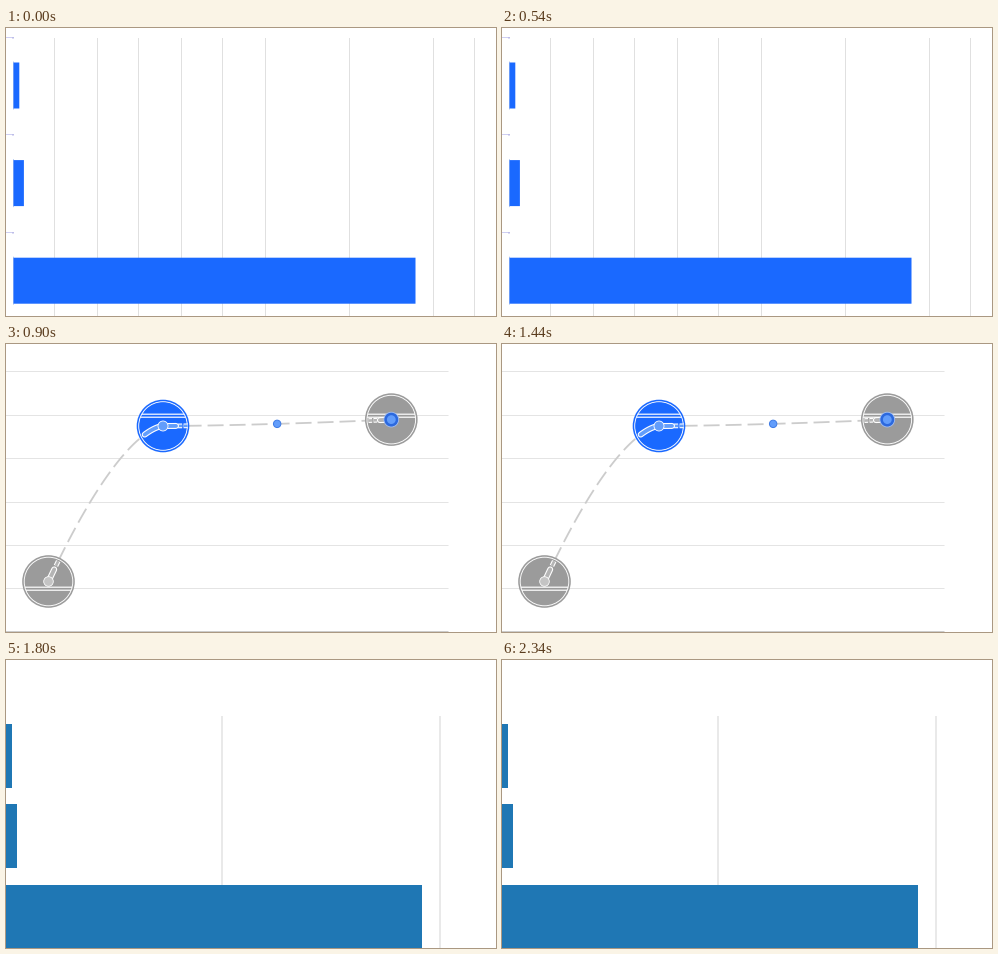
These frames come from a looping animation (490x288 px, 2700 ms). A matplotlib script:

```python
import matplotlib.pyplot as plt
import numpy as np
from matplotlib.animation import ArtistAnimation
from matplotlib.patches import Circle, PathPatch, Rectangle
from matplotlib.path import Path

W, H, DPI = 490, 288, 100
PX = 72 / DPI  # points per pixel

VALUES = (5.8, 10.4, 402)
BLUE, STEEL, SKY = "#1a69ff", "#1f77b4", "#629dfb"
GRAY, SILVER = "#9b9b9b", "#b4b4b4"

fig = plt.figure(figsize=(W / DPI, H / DPI), dpi=DPI, facecolor="white")
ax = fig.add_axes([0, 0, 1, 1])
ax.set_xlim(0, W)
ax.set_ylim(H, 0)
ax.axis("off")


def box(x, y, w, h, color):
    return ax.add_patch(Rectangle((x, y), w, h, fc=color, lw=0, snap=False))


def disc(x, y, r, fill, edge="none", width=0.0):
    return ax.add_patch(Circle((x, y), r, fc=fill, ec=edge, lw=width * PX))


def stroke(points, color, width, dash=None, cap="butt"):
    style = "-" if dash is None else (0, tuple(d / width for d in dash))
    return ax.add_patch(PathPatch(
        Path(points), fc="none", ec=color, lw=width * PX, ls=style,
        capstyle=cap, joinstyle="round", snap=False))


def outlined(points, fill, width, cap="butt"):
    return [stroke(points, "white", width + 2.2, cap=cap),
            stroke(points, fill, width, cap=cap)]


# The route bends away from its middle stop towards both ends.
START, MIDDLE, END = (42.5, 237.5), (157, 82), (385.3, 75.6)


def leg(end, u0, u1, n=40):
    """Part of the route between two shares of the way from MIDDLE to end."""
    u = np.linspace(u0, u1, n)
    x = MIDDLE[0] + (end[0] - MIDDLE[0]) * u
    y = MIDDLE[1] + (end[1] - MIDDLE[1]) * u ** 1.58
    return np.column_stack([x, y])


def wide_bars():
    # Grid lines sit 42 px apart, every other one rounded down.
    parts = [box(7 + 42 * k - k % 2, 10, 1, H, "#e0e0e0")
             for k in range(1, 12) if k not in (7, 9)]
    for k, value in enumerate(VALUES):
        tick, top = round(8.6 + 97.6 * k), 34.5 + 97.6 * k
        parts += [box(0, tick, 6, 1, "#cfcff2"),
                  box(6, tick, 2, 1.5, "#bdbde8"),
                  box(7, top - 1, 1, 48, "#b9cdf2"),
                  box(7.5, top, value, 46, BLUE)]
    return parts


def badge(center, color, rail):
    """Filled disc with a thin ring and an outlined rail."""
    x, y = center
    r = 24.3
    parts = [disc(x, y, 26.3, color), disc(x, y, r, "none", "white", 0.9)]
    for line in (rail - 1.5, rail + 1.5):
        reach = (r ** 2 - (line - y) ** 2) ** 0.5
        parts.append(stroke([(x - reach, line), (x + reach, line)],
                            "white", 1.2))
    return parts


def dashed_route():
    rows = [round(27.4 + 43.4 * k) for k in range(6)]
    parts = [box(0, y, 442.5, 1, "#e4e4e4") for y in rows]
    parts.append(box(0, H - 1, 442.5, 1, "#cccccc"))

    route = np.vstack([leg(START, 1, 0), leg(END, 0, 1)])
    parts.append(stroke(route, "#cccccc", 1.8, (16, 6)))

    parts += badge(START, GRAY, rows[5] + 0.7)
    parts += outlined(leg(START, 0.915, 0.935), SILVER, 2.6)
    parts += outlined(leg(START, 0.95, 1), SILVER, 3.8, "round")
    parts.append(disc(*START, 4.8, "#c4c4c4", "white", 0.8))

    parts += badge(MIDDLE, BLUE, rows[1] + 0.7)
    for u in (0.066, 0.09):
        parts += outlined(leg(END, u, u + 0.018), SKY, 2.6)
    arm = np.vstack([leg(START, 0.16, 0), leg(END, 0, 0.057)])
    parts += outlined(arm, SKY, 3.8, "round")
    parts.append(disc(*MIDDLE, 5, SKY, "white", 0.8))

    parts += badge(END, GRAY, rows[1] + 0.7)
    for u in (0.9, 0.922):
        parts += outlined(leg(END, u, u + 0.016), SILVER, 2.6)
    parts += outlined(leg(END, 0.95, 1), SILVER, 3.8, "round")

    halfway = leg(END, 0.5, 0.5, 1)[0]
    parts += [disc(*halfway, 3.7, SKY, "#3f7ce6", 1),
              disc(*END, 7.4, "#2c69de", "#a9c3f2", 0.8),
              disc(*END, 4.4, SKY)]
    return parts


def close_bars():
    parts = [box(x, 56, 2, H, "#e9e9e9") for x in (215, 433)]
    for k, value in enumerate(VALUES):
        parts.append(box(0, round(64 + 80.5 * k), round(1.035 * value), 64,
                         STEEL))
    return parts


scenes = [wide_bars(), dashed_route(), close_bars()]
anim = ArtistAnimation(fig, scenes, interval=900, repeat=True, repeat_delay=0)
plt.show()
```
